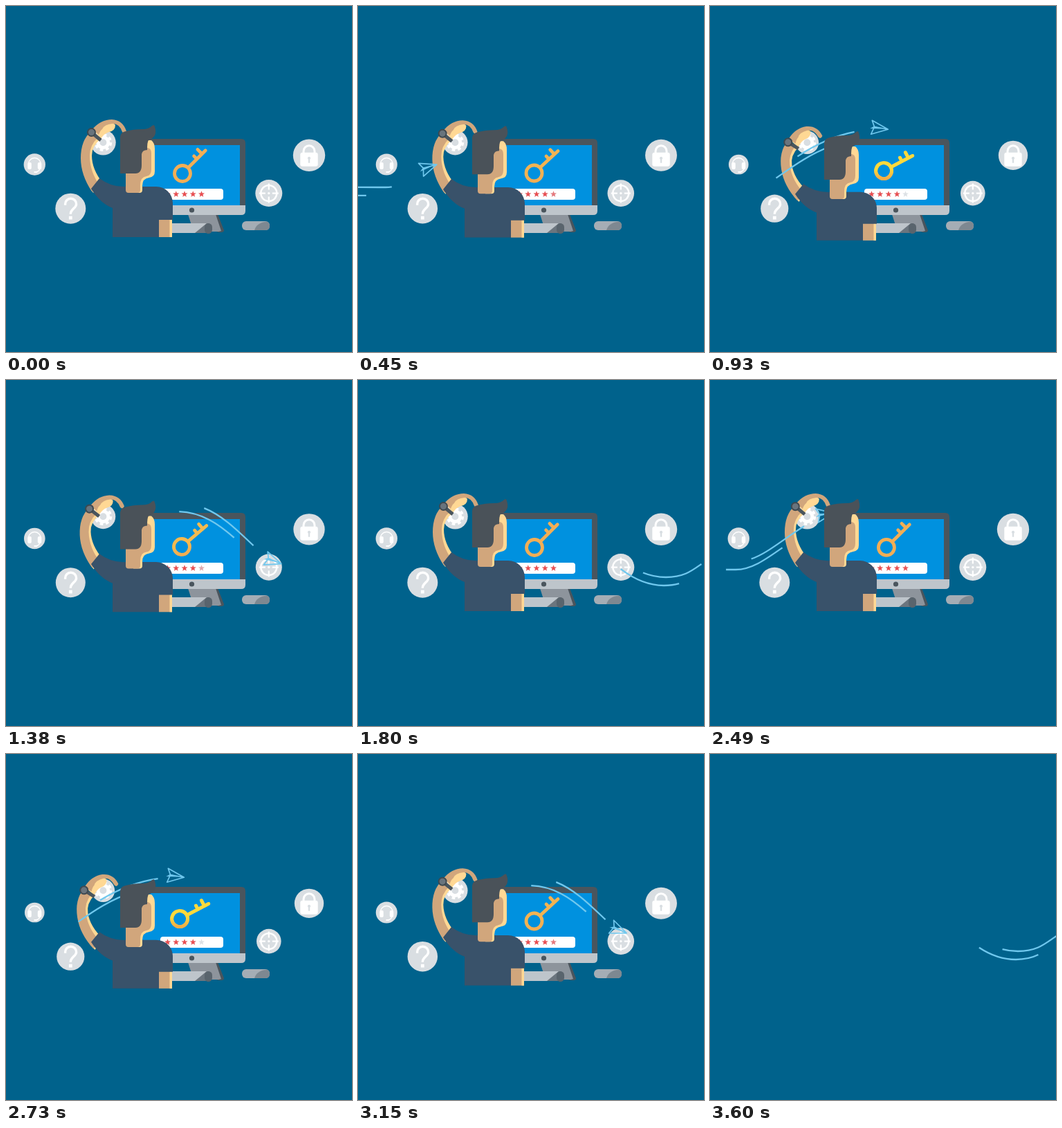
These frames come from a looping animation (500x500 px, 3630 ms). An HTML page:

```html
<!DOCTYPE html>
<html lang="en">
<head>
<meta charset="utf-8">
<title>Password reminder</title>
<style>
  html, body { margin: 0; width: 100%; height: 100%; overflow: hidden; background: #00628c; }
  svg { display: block; width: 100vw; height: 100vh; }
  .disc { fill: #d9dee2; }
  .white { fill: #fff; }
  .line { fill: none; stroke: #fff; }
  .dark { fill: #4a555d; }
  .pale { fill: #bec5cb; }
  .skin { fill: #d1a67c; }
  .light { fill: #ffd894; }
  .shirt { fill: #39526a; }
  .trail { fill: none; stroke: #70c8ee; stroke-width: 2.3; }
</style>
</head>
<body>
<svg viewBox="0 0 500 500">
  <defs>
    <linearGradient id="gold" gradientUnits="userSpaceOnUse" x1="-5" y1="10" x2="1" y2="-2">
      <stop offset="0" stop-color="#f4ad45"/>
      <stop offset="1" stop-color="#fddc3c"/>
    </linearGradient>
    <g id="keyShape" fill="none" stroke-width="4.8">
      <circle r="11.5"/>
      <path d="M12 0H47M29.5 0V-6M40 0V-9" stroke-linecap="round"/>
    </g>
    <path id="route" d="M-120 256C-60 262-10 262 40 262C95 262 135 178 250 178C335 178 365 285 445 285C475 285 485 273 505 260L700 133"/>
  </defs>

  <g class="scene">
    <g id="icons">
      <g transform="translate(41.3 229)">
        <circle class="disc" r="15.7"/>
        <path class="line" stroke-width="1.3" d="M-9 0A9 9.5 0 0 1 9 0M8 5Q7 10 2 11"/>
        <rect class="white" x="-10" y="-3" width="5.5" height="10" rx="2"/>
        <rect class="white" x="4.5" y="-3" width="5.5" height="10" rx="2"/>
        <rect class="white" x="-1" y="10" width="5" height="2" rx="1"/>
      </g>
      <g transform="translate(93.3 292.7)">
        <circle class="disc" r="22"/>
        <path class="line" stroke-width="3.4" d="M-7.7-5V-6.5A8 8 0 0 1 8.3-6.5C8.3 0 0 0 0 8"/>
        <rect class="white" x="-2.4" y="11" width="4.8" height="4.8"/>
      </g>
      <g transform="translate(438 215.8)">
        <circle class="disc" r="23.2"/>
        <path class="line" stroke-width="3" d="M-8-3V-6A8 8 0 0 1 8-6V-3"/>
        <rect class="white" x="-12.7" y="-4" width="25.4" height="20" rx="3"/>
        <path fill="#d9dee2" d="M0 2A2.2 2.2 0 0 1 1.2 6V11H-1.2V6A2.2 2.2 0 0 1 0 2Z"/>
      </g>
      <g transform="translate(379.8 270.6)">
        <circle class="disc" r="19.5"/>
        <circle class="line" r="11.5" stroke-width="2.4"/>
        <path class="line" stroke-width="2.2" d="M-14 0H-5M5 0H14M0-14V-5M0 5V14"/>
        <circle class="white" r="1.7"/>
      </g>
      <g transform="translate(140.4 197.3)">
        <circle class="disc" r="18.3"/>
        <circle class="line" r="7.5" stroke-width="5"/>
        <circle class="line" r="11" stroke-width="3.5" stroke-dasharray="4.6 4.04"/>
      </g>
    </g>

    <path fill="#8d949c" d="M263 301H304L313 326H271Z"/>
    <path class="dark" d="M303 301H306L315 324Q315 327 311 327H304L311 325Z"/>
    <path class="dark" d="M176 192H340Q346 192 346 198V289H176Z"/>
    <path fill="#0091df" d="M184 201H338V289H184Z"/>
    <path class="pale" d="M176 288H346V296Q346 302 340 302H176Z"/>
    <circle class="dark" cx="268.5" cy="295" r="3.6"/>
    <path class="pale" d="M232 314H292V328H232Z"/>
    <path fill="#6b757e" d="M273 328L290 314H294V328Z"/>
    <rect fill="#59646d" x="287" y="314" width="11" height="15" rx="5.5"/>
    <rect fill="#a5adb5" x="341" y="311" width="40" height="13" rx="6"/>
    <path fill="#7e8891" d="M359 324Q362 313 377 311.5Q381 313 381 317V318Q381 324 375 324Z"/>

    <rect class="white" x="223" y="264" width="91" height="16" rx="4"/>
    <g id="stars"></g>
    <g id="key">
      <use href="#keyShape" stroke="#f2ae56"/>
      <use href="#keyShape" stroke="url(#gold)" id="shine"/>
    </g>

    <g id="arm">
      <path class="light" d="M126 270Q109 246 109 220Q109 195 124 182L137 192Q124 202 124 216Q124 236 140 256Z"/>
      <path class="skin" d="M124 268Q108 244 108 220Q108 194 123 181L133 190Q121 201 121 216Q121 240 136 260Z"/>
      <path class="light" d="M128 181Q139 168 154 168L158 172Q158 180 149 182Q142 184 137 192Z"/>
      <path class="skin" d="M125 178Q137 164 153 164Q169 165 174 181Q171 186 168 182Q164 170 154 170Q142 171 139 178Q136 180 134 186Z"/>
      <path d="M124 183L137 194" stroke="#4a555d" stroke-width="5"/>
      <circle cx="123.5" cy="182.5" r="5.5" fill="#69747d" stroke="#3f4950" stroke-width="2"/>
    </g>
  </g>

  <use href="#route" class="trail" id="upper"/>
  <use href="#route" class="trail" id="lower" x="-3" y="12"/>
  <g id="plane">
    <path class="trail" style="stroke-width:1.7" stroke-linejoin="round" d="M14 0L-10-11L-6-2L14 0L-10 9L-6-2"/>
    <path fill="#70c8ee" d="M-12 1L-6-3L5 0Z"/>
  </g>

  <g class="scene">
    <g id="torso">
      <path class="skin" d="M221 306H240V334H221Z"/>
      <path class="light" d="M236.5 306H240V334H236.5Z"/>
      <path class="shirt" d="M154 334V292Q136 285 123 264L135 249Q152 262 173 261H217A24 24 0 0 1 241 285V309H221V334Z"/>
    </g>
    <g id="head">
      <path class="light" d="M190 194H210Q215 198 215 206V239Q215 247 207 248Q197 249 197 260V266Q197 270 193 270H184V194Z"/>
      <path class="skin" d="M186 205H205Q210 206 210 213V236Q210 245 203 246Q194 247 194 259V266Q194 270 190 270H177Q173 270 173 266V236Z"/>
      <path fill="#4a5259" d="M165 242V189Q166 182 173 181Q184 178 197 178Q207 178 211 173L214 172Q218 181 215 187Q212 192 206 194Q204 196 204 208Q197 208 196 214V230Q196 242 187 242Z"/>
    </g>
  </g>
</svg>
<script>
const LOOP = 3630, STEP = 30, SCENE_END = 3600;
const SWAY = 600, FLIGHT = 1800, TRAIL = 1770;
const LEAD = 120;  // route length left of the stage
const $ = id => document.getElementById(id);
const set = (el, name, value) => el.setAttribute(name, value);

const star = Array.from({ length: 10 }, (_, i) => {
  const r = i % 2 ? 2 : 4.7, a = (i / 5 - .5) * Math.PI;
  return `${r * Math.cos(a)},${r * Math.sin(a)}`;
}).join(" ");
$("stars").innerHTML = Array.from({ length: 5 }, (_, i) =>
  `<g transform="translate(${233.5 + i * 12.25} 272)"><polygon points="${star}" fill="#dce1e5"/>` +
  `<polygon points="${star}" fill="#e94f52"/></g>`).join("");
const lastStar = $("stars").lastElementChild.lastElementChild;

const discs = [...document.querySelectorAll("#icons .disc")];
const radii = discs.map(d => +d.getAttribute("r"));
const scenes = document.querySelectorAll(".scene");
const route = $("route");

// Lingers at rest, then swings out and back within each period.
function swayAt(t) {
  const half = SWAY / 2, w = 1 - Math.abs(t % SWAY - half) / half;
  return 1.08 * (1 - Math.cos(Math.PI * w ** 2.2)) / 2;
}

function drawTrail(id, end, length) {
  set($(id), "stroke-dasharray", `${length} 3000`);
  set($(id), "stroke-dashoffset", length - LEAD - end);
}

function drawPlane(t) {
  const d = t % FLIGHT - 930;
  const s = LEAD + 264 + .352 * d + 55e-6 * d * d;
  const [p, a, b] = [s, s + 15, s + 25].map(n => route.getPointAtLength(n));
  const angle = .6 * Math.atan2(b.y - a.y, b.x - a.x) * 180 / Math.PI;
  set($("plane"), "transform", `translate(${p.x} ${p.y - 1}) rotate(${angle})`);
}

function draw(t) {
  scenes.forEach(s => s.style.display = t < SCENE_END ? "" : "none");

  const v = swayAt(t);
  set($("head"), "transform", `translate(0 ${9.3 * v})`);
  set($("torso"), "transform", `translate(0 ${334 + 5 * v}) scale(1 ${1 - .042 * v}) translate(0 -334)`);
  set($("arm"), "transform", `translate(${.5 * v} ${13 * v}) rotate(${-9 * v} 129 257)`);
  set($("key"), "transform", `translate(${255 - 4 * v} ${242 - 4 * v}) rotate(${-45 + 18 * v})`);
  set($("shine"), "opacity", Math.min(v, 1));
  set(lastStar, "opacity", Math.max(0, 1 - 2.4 * v));
  discs.forEach((d, i) => set(d, "r", radii[i] * (1 - .09 * v)));

  const end = 229 + .375 * ((t < 2000 ? t : t - TRAIL) - 930);
  drawTrail("upper", end, 90);
  drawTrail("lower", end - 34, 90);
  drawPlane(t);
}

const start = performance.now();
function tick() {
  const t = (performance.now() - start) % LOOP;
  draw(Math.floor(t / STEP) * STEP);
  requestAnimationFrame(tick);
}
tick();
</script>
</body>
</html>
```
